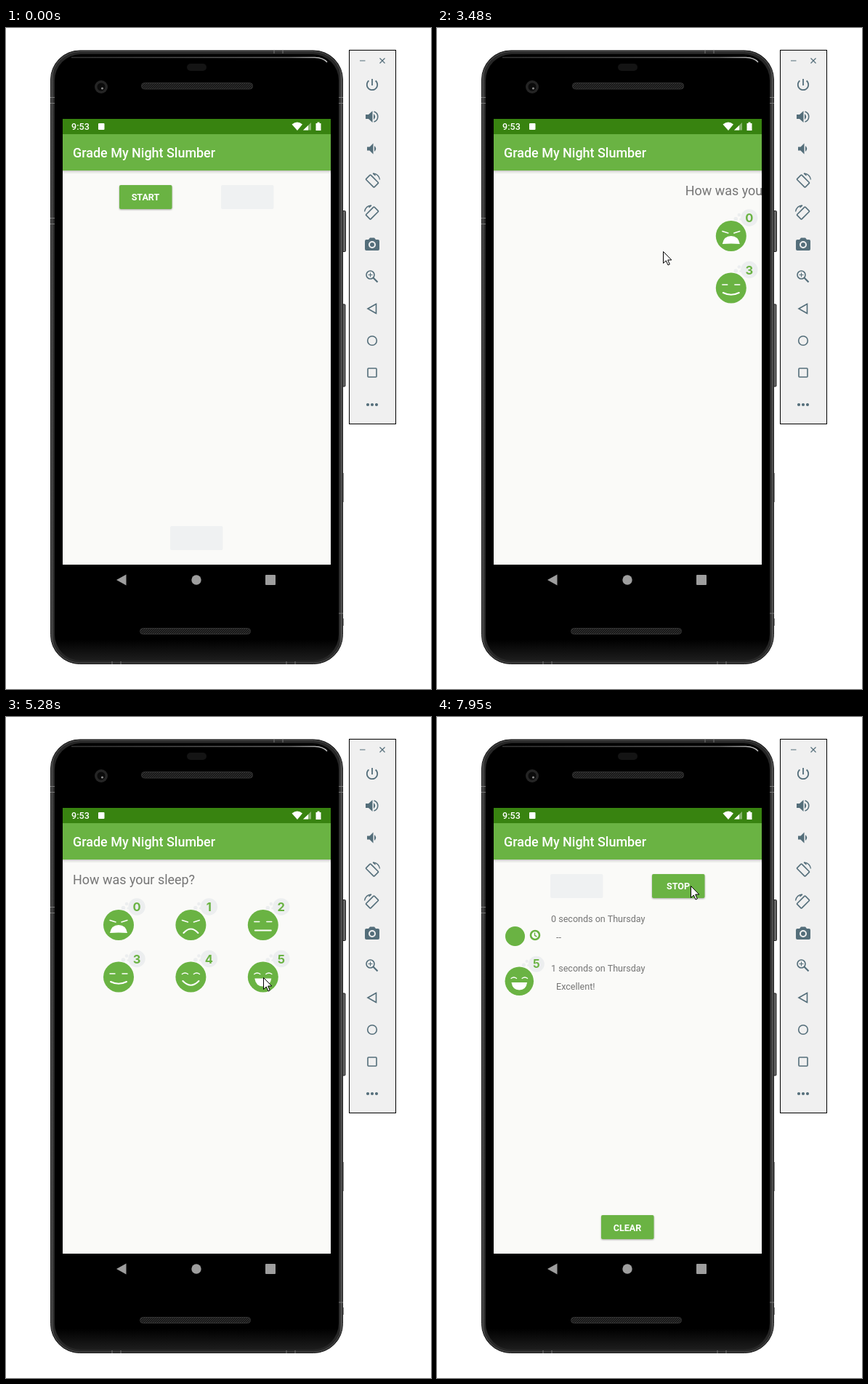
An HTML page for the animation above (8000 ms loop, 585 by 909 pixels).

```html
<!DOCTYPE html>
<html lang="en">
<head>
<meta charset="utf-8">
<title>Sleep tracker demo</title>
<style>
  html, body { margin: 0; width: 100%; height: 100%; overflow: hidden; background: #fff; }
  svg { display: block; width: 100vw; height: 100vh; font-family: Roboto, sans-serif; }
  .btn rect { fill: #6ab343; filter: drop-shadow(0 1px 1px #0005); }
  .btn text { fill: #fff; font: 700 12.57px Roboto, sans-serif; text-anchor: middle; }
  .btn.off rect { fill: #eff1f2; filter: none; }
  .btn.off text { opacity: 0; }
  .note { fill: #757575; font-size: 12.57px; }
  .digit { fill: #6ab343; font: 700 16.5px Inter, sans-serif; text-anchor: middle; }
  .line { fill: none; stroke: #fff; stroke-width: 1.7; stroke-linecap: round; }
  .tool { fill: #546e7a; }
  .stroke { fill: none; stroke: #546e7a; stroke-width: 1.6; }
</style>
</head>
<body>
<svg viewBox="0 0 585 909">
  <defs>
    <linearGradient id="metal">
      <stop offset="0" stop-color="#555"/><stop offset=".012" stop-color="#262626"/>
      <stop offset=".988" stop-color="#262626"/><stop offset="1" stop-color="#666"/>
    </linearGradient>
    <linearGradient id="glass" x2="0" y2="1">
      <stop offset="0" stop-color="#000"/><stop offset=".965" stop-color="#000"/><stop offset="1" stop-color="#1d1d1d"/>
    </linearGradient>
    <linearGradient id="sheen">
      <stop offset="0" stop-color="#333"/><stop offset=".85" stop-color="#666"/><stop offset="1" stop-color="#ccc"/>
    </linearGradient>
    <pattern id="mesh" width="3" height="3" patternUnits="userSpaceOnUse">
      <rect width="3" height="3" fill="#151515"/><path d="M0 3L3 0" stroke="#444" stroke-width=".8"/>
    </pattern>
    <clipPath id="screen"><rect x="78" y="197" width="369" height="541"/></clipPath>
  </defs>

  <!-- phone -->
  <g fill="#666" stroke="#222">
    <rect x="461.5" y="251.5" width="6" height="56" rx="1"/>
    <rect x="461.5" y="380" width="5.5" height="113" rx="1"/>
    <path d="M464 612V652M464 812V822"/>
  </g>
  <rect x="61.5" y="31" width="402" height="843.5" rx="40" fill="url(#metal)" stroke="#1c1c1c"/>
  <rect x="63" y="32.5" width="399" height="840.5" rx="38.5" fill="none" stroke="#4d4d4d"/>
  <path d="M61 95.500H67M61 103.500H67M61 261.500H67M61 269.500H67M458 95.500H464M458 103.500H464M458 805H464M369 31V35M381 31V35M146 871V875M158 871V875M386 871V875M398 871V875" stroke="#777"/>
  <rect x="67" y="36" width="391" height="834" rx="36" fill="url(#glass)"/>
  <path d="M90 40.500H425Q437 41 442 47" fill="none" stroke="url(#sheen)" stroke-width="1.3"/>
  <rect x="249" y="49" width="27" height="10" rx="5" fill="#141414"/>
  <rect x="186.500" y="75.500" width="153" height="8.500" rx="4" fill="url(#mesh)" stroke="#333"/>
  <rect x="184.500" y="825.500" width="152" height="8" rx="4" fill="url(#mesh)" stroke="#333"/>
  <circle cx="131" cy="81" r="9" fill="#252525"/>
  <circle cx="131" cy="81" r="5.5" fill="#0b0b0b"/>
  <circle cx="132.500" cy="83" r="1.6" fill="#888"/>
  <g fill="#9e9e9e">
    <path d="M152 759L165.500 751.500V766.500Z"/>
    <circle cx="262" cy="759" r="6.700"/>
    <rect x="357" y="752" width="14" height="14" rx="1"/>
  </g>

  <!-- app -->
  <rect x="78" y="125" width="369" height="613" fill="#fafaf8"/>
  <rect x="78" y="196" width="369" height="1.500" opacity=".16"/>
  <rect x="78" y="197" width="369" height="3" opacity=".05"/>
  <rect x="78" y="146" width="369" height="50" fill="#6ab343"/>
  <rect x="78" y="125" width="369" height="21" fill="#388310"/>
  <g fill="#fff">
    <text x="90" y="140" font-size="12.600" font-weight="500">9:53</text>
    <rect x="127" y="131" width="8.500" height="9" rx="1"/>
    <path d="M393.500 132.500Q401 126.500 408 132.500L401 141Z"/>
    <path d="M420 130V140.500H409Z" opacity=".4"/>
    <path d="M416 134V140.500H409Z"/>
    <path d="M426.500 131H428.500V129.500H431.500V131H433.500V141H426.500Z"/>
    <text x="92" y="178" font-size="17.960" font-weight="500">Grade My Night Slumber</text>
  </g>
  <g clip-path="url(#screen)">
    <g id="home">
      <g id="start" class="btn"><rect x="156" y="216" width="72.500" height="33" rx="2"/><text x="192" y="237">START</text></g>
      <g id="stop" class="btn"><rect x="296" y="216" width="72.500" height="33" rx="2"/><text x="332" y="237">STOP</text></g>
      <g id="clear" class="btn"><rect x="226" y="685" width="72.500" height="33" rx="2"/><text x="262" y="706.500">CLEAR</text></g>
      <g id="active">
        <circle cx="107.500" cy="301.500" r="13.500" fill="#6ab343"/>
        <circle cx="135" cy="300" r="6" fill="#fff" stroke="#6ab343" stroke-width="2.600"/>
        <path d="M134.500 296.500V300.500L137.500 302" fill="none" stroke="#6ab343" stroke-width="1.500"/>
        <text class="note" x="157" y="282">0 seconds on Thursday</text>
        <text class="note" x="164" y="306.500">--</text>
      </g>
      <g id="done">
        <g id="doneFace" transform="translate(113.300 294.800) scale(.94)"></g>
        <text class="note" x="157" y="282">1 seconds on Thursday</text>
        <text class="note" x="164" y="306.500">Excellent!</text>
      </g>
    </g>
    <g id="rating">
      <text x="92" y="230" font-size="17.960" fill="#757575">How was your sleep?</text>
      <g id="faces"></g>
    </g>
  </g>

  <!-- emulator toolbar -->
  <rect x="472.500" y="30.500" width="64" height="514" fill="#f0f0f0" stroke="#000"/>
  <path class="stroke" style="stroke-width:1.2" d="M487 45H494.500M514.500 41.500L521.500 48.500M521.500 41.500L514.500 48.500"/>
  <g class="tool">
    <path transform="translate(493.200 67.200) scale(.9)" d="M13 3h-2v10h2zM17.830 5.170l-1.420 1.420C17.990 7.860 19 9.810 19 12c0 3.870-3.130 7-7 7s-7-3.130-7-7c0-2.190 1.010-4.140 2.580-5.420L6.170 5.170C4.230 6.820 3 9.260 3 12c0 4.970 4.030 9 9 9s9-4.030 9-9c0-2.740-1.230-5.180-3.170-6.830z"/>
    <path d="M495 119V125H499L504.500 130V114L499 119ZM506 118Q510.500 122 506 126Z"/>
    <path d="M497 163.500V168.500H500.500L505.500 173.500V158.500L500.500 163.500ZM507 162Q511.500 166 507 170Z"/>
    <path fill-rule="evenodd" d="M501 288.500H507L509 291H512Q514 291 514 293V304Q514 306 512 306H496Q494 306 494 304V293Q494 291 496 291H499ZM504 293A5 5 0 0 0 504 303A5 5 0 0 0 504 293Z"/>
    <circle cx="504" cy="298" r="3"/>
    <circle cx="498" cy="518" r="2.100"/><circle cx="504" cy="518" r="2.100"/><circle cx="510" cy="518" r="2.100"/>
  </g>
  <g class="stroke">
    <path d="M506.500 115A7.300 7.300 0 0 1 506.500 129"/>
    <g id="rotate">
      <rect x="-4.500" y="-8" width="9" height="16" rx="1" transform="rotate(-45)"/>
      <path d="M1 -10.500Q9 -10 10.500 -2M1 -10.500L4.500 -7.500" stroke-width="1.300"/>
    </g>
    <circle cx="501.500" cy="339.500" r="5.500"/>
    <path d="M505.500 343.500L511.500 349.500" stroke-width="2.200"/>
    <path d="M498.500 339.500H504.500M501.500 336.500V342.500" stroke-width="1.100"/>
    <path d="M498 386L509.500 379.500V392.500Z"/>
    <circle cx="504" cy="430" r="6.300"/>
    <rect x="498" y="468" width="12" height="12" rx="1"/>
  </g>

  <path id="cursor" d="M.500 .500V16.500L4.300 13L7 19L9.300 18L6.700 12H11.800Z" fill="#fff" stroke="#000"/>
</svg>
<script>
const $ = id => document.getElementById(id);
const LOOP = 8000;

// Eyes and mouth for each score
const flatEyes = 'M-12 -4.500H-5M5 -4.500H12', archEyes = 'M-12 -4Q-8 -7 -4 -4M4 -4Q8 -7 12 -4';
const slantEyes = 'M-12 -6.500L-4 -4M4 -4L12 -6.500';
const looks = [
  [slantEyes, 'M-12 11Q-10 0 0 0Q10 0 12 11Q0 10 -12 11Z', true],
  [slantEyes, 'M-10 11Q0 0 10 11'],
  [flatEyes, 'M-11 7.500H11'],
  [flatEyes, 'M-11 6.500Q0 12 11 6.500'],
  [archEyes, 'M-11 5.500Q0 17 11 5.500'],
  [archEyes, 'M-11.500 2H11.500Q10 13 0 13Q-10 13 -11.500 2Z', true],
];
const face = score => {
  const [eyes, mouth, filled] = looks[score];
  return `<g fill="#eceeef"><circle cx="25" cy="-25" r="11.700"/><circle cx="11" cy="-29" r="2.300"/><circle cx="6.500" cy="-23.500" r="2.800"/><circle cx="13" cy="-23" r="1.600"/></g>
    <circle r="21" fill="#6ab343"/><path class="line" style="stroke-width:1.4" d="${eyes}"/>
    <path class="line" ${filled ? 'style="fill:#fff;stroke:none"' : 'style="stroke-width:2"'} d="${mouth}"/>
    <text class="digit" x="25" y="-19">${score}</text>`;
};
$('doneFace').innerHTML = face(5);
$('faces').innerHTML = looks.map((_, i) =>
  `<g transform="translate(${155 + i % 3 * 99.4} ${i < 3 ? 286 : 357.5})">${face(i)}</g>`).join('');

const mirrored = $('rotate').cloneNode(true);
mirrored.removeAttribute('id');
$('rotate').after(mirrored);
$('rotate').setAttribute('transform', 'translate(504 210.500)');
mirrored.setAttribute('transform', 'translate(504 254.500) scale(-1 1)');

const bursts = [
  [290, 840, 8], [990, 1770, 11], [2150, 2840, 10], [3010, 3800, 11], [3880, 4580, 10], [4730, 5280, 8],
  [5430, 5430, 1], [5570, 6300, 11], [6380, 6920, 8], [7090, 7240, 3], [7560, 7640, 2], [7780, 7950, 3],
];
function stepped(t) {
  const burst = bursts.findLast(b => b[0] <= t);
  if (!burst) return 0;
  const [start, end, count] = burst;
  if (count < 2) return start;
  const step = (end - start) / (count - 1);
  return start + Math.min(count - 1, Math.floor((t - start) / step + .2)) * step;
}

// Pointer stops: time, x, y
const stops = [
  [290, 469, 851], [840, 183, 215], [990, 183, 215], [1310, 189, 229], [1530, 189, 229], [1770, 215, 260],
  [2150, 217, 265], [2400, 262, 327], [2690, 337, 243], [2840, 343, 234], [3150, 343, 234], [3480, 311, 307],
  [3800, 305, 340], [4180, 322, 354], [4580, 300, 353], [4850, 274, 348], [5280, 354, 358], [5570, 354, 358],
  [6220, 199, 226], [6500, 199, 226], [6920, 335, 313], [7090, 337, 305], [7240, 348, 240],
  [7560, 348, 239], [7640, 348, 237], [7950, 349, 232],
];
const progress = (t, from, to) => Math.min(1, Math.max(0, (t - from) / (to - from)));
const ease = p => (1 - Math.cos(Math.PI * p)) / 2;
function pointer(t) {
  const next = stops.findIndex(s => s[0] > t);
  if (next < 0) return stops.at(-1).slice(1);
  if (next === 0) return stops[0].slice(1);
  const [t0, x0, y0] = stops[next - 1], [t1, x1, y1] = stops[next];
  const p = ease(progress(t, t0, t1));
  return [x0 + (x1 - x0) * p, y0 + (y1 - y0) * p];
}

const show = (id, on) => { $(id).style.display = on ? '' : 'none'; };
const move = (id, x, y) => $(id).setAttribute('transform', `translate(${x} ${y})`);
const enable = (id, on) => $(id).classList.toggle('off', !on);

function draw(t) {
  const running = t >= 1420 && t < 3230 || t >= 6450;
  show('home', t < 3230 || t >= 5570);
  show('rating', t >= 3230 && t < 5430);
  show('active', running);
  show('done', t >= 5570);
  enable('start', !running);
  enable('stop', running);
  enable('clear', t >= 1420);

  $('active').style.opacity = t < 5000 ? progress(t, 1420, 1600) : progress(t, 6690, 6830);
  $('done').style.opacity = progress(t, 5600, 5760);
  move('done', 0, 68.4 * ease(progress(t, 6450, 6700)));
  move('rating', 369 * (1 - ease(progress(t, 3230, 3890))), 0);

  show('cursor', t >= 290);
  move('cursor', ...pointer(t).map(Math.round));
}

function tick() {
  draw(stepped(performance.now() % LOOP));
  requestAnimationFrame(tick);
}
tick();
</script>
</body>
</html>
```
